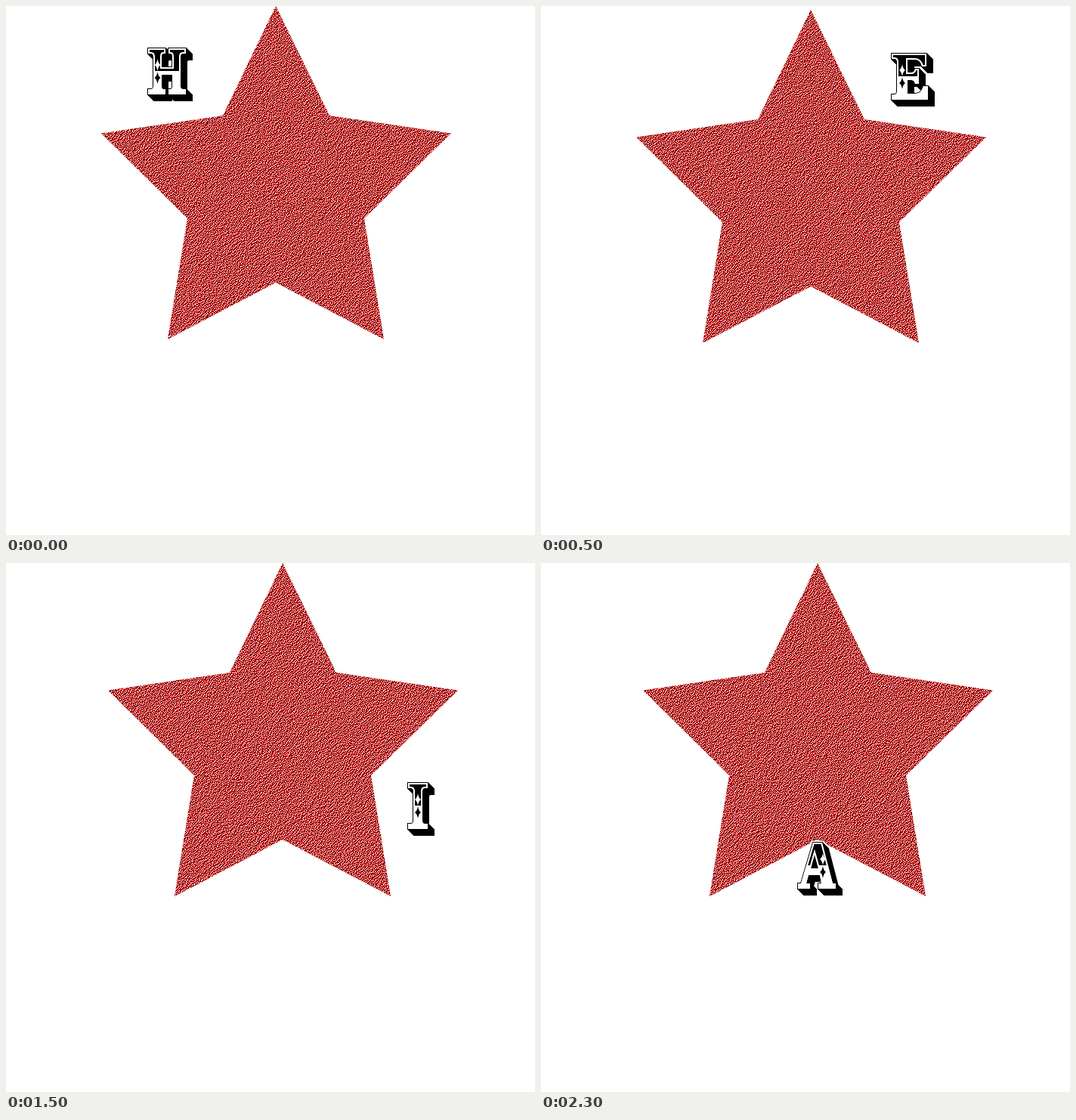
An HTML page with a canvas for the animation above (2500 ms loop, 700 by 700 pixels).

```html
<!DOCTYPE html>
<html lang="en">
<head>
<meta charset="utf-8">
<title>Glitter star</title>
<style>
  html, body { margin: 0; width: 100%; height: 100%; overflow: hidden; background: #fff; }
  canvas { display: block; }
</style>
</head>
<body>
<canvas id="stage" width="700" height="700" role="img" aria-label="HEFIA"></canvas>
<script>
const ctx = document.getElementById('stage').getContext('2d');
const SIZE = 700, TILE = 256, STEP = 500, DEPTH = 8;

// Shared left side of a slab-serif stem, drawn upwards from the baseline.
const STEM = 'H0v-7h4q3 0 3-4V11q0-4-3-4H0z';
const ARMS = 'M0 0h46v17h-6q-2-9-9-9H21v17h5q4 0 5-5h5v20h-5q-1-5-5-5h-5';
const glyphs = {
  H: 'M0 0h23v7h-3q-2 0-2 4v14h14v-14q0-4-2-4h-3v-7h23v7h-4q-3 0-3 4v39q0 4 3 4h4v7h-23v-7h3q2 0 2-4V35H18v15q0 4 2 4h3v7' + STEM,
  E: ARMS + 'v18h11q7 0 10-10h6v18' + STEM,
  F: ARMS + 'v15q0 4 3 4h5v7' + STEM,
  I: 'M0 0h26v7h-4q-3 0-3 4v39q0 4 3 4h4v7' + STEM,
  A: 'M20 0h12l14 54h4v7H27v-7h4l-2-11H14l-3 11h5v7H0v-7h4zM22 16l-5 18h10z'
};

// Each step: letter, its corner, x of its ornament, star offset, glitter seed.
const steps = [
  { letter: 'H', x: 188, y: 56, gem: 12.5, dx: 0, dy: 0, seed: 1 },
  { letter: 'E', x: 464, y: 63, gem: 14, dx: 0, dy: 5, seed: 2 },
  { letter: 'F', x: 124, y: 290, gem: 14, dx: 0, dy: 0, seed: 1 },
  { letter: 'I', x: 532, y: 291, gem: 13, dx: 9, dy: 0, seed: 3 },
  { letter: 'A', x: 340, y: 370, gem: 33, dx: 9, dy: 0, seed: 3 }
];

const star = new Path2D(
  'M357 0L428 145L589 168.500L474 281L500 441L357 366L214 441L240 281L126 168.500L287 145Z');

function random(seed) {
  let a = seed * 7919;
  return () => {
    a = (a + 0x6D2B79F5) | 0;
    let t = Math.imul(a ^ (a >>> 15), 1 | a);
    t = (t + Math.imul(t ^ (t >>> 7), 61 | t)) ^ t;
    return ((t ^ (t >>> 14)) >>> 0) / 4294967296;
  };
}

const specks = [[255, 0, 0], [0, 0, 0], [255, 255, 255]];
const shares = [.52, .22, .26];

// Even glitter: a colour not chosen here is more likely to the right and below.
function glitter(seed) {
  const tile = document.createElement('canvas');
  tile.width = tile.height = TILE;
  const tileCtx = tile.getContext('2d');
  const image = tileCtx.createImageData(TILE, TILE);
  const next = random(seed);
  const below = Array.from({ length: TILE }, () => [0, 0, 0]);
  for (let y = 0; y < TILE; y++) {
    let carry = [0, 0, 0];
    for (let x = 0; x < TILE; x++) {
      const want = shares.map((share, k) => share + carry[k] + below[x][k]);
      const scores = want.map(w => w + next() * .8);
      const pick = scores.indexOf(Math.max(...scores));
      want[pick] -= 1;
      carry = below[x] = want.map(w => w / 2);
      image.data.set([...specks[pick], 255], (y * TILE + x) * 4);
    }
  }
  tileCtx.putImageData(image, 0, 0);
  return ctx.createPattern(tile, 'repeat');
}

const patterns = { 1: glitter(1), 2: glitter(2), 3: glitter(3) };

function diamond(x, top, color) {
  ctx.fillStyle = color;
  ctx.fill(new Path2D(`M${x} ${top}q1 6 4 8q-3 2-4 8q-1-6-4-8q3-2 4-8z`));
}

function extrude(path, color, width) {
  ctx.fillStyle = ctx.strokeStyle = color;
  ctx.lineWidth = width;
  for (let k = 0; k <= DEPTH; k++) {
    ctx.save();
    ctx.translate(k, k);
    ctx.fill(path, 'evenodd');
    ctx.stroke(path);
    ctx.restore();
  }
}

function drawLetter({ letter, x, y, gem }) {
  const path = new Path2D(glyphs[letter]);
  ctx.save();
  ctx.translate(x, y);
  extrude(path, '#fff', 5);
  extrude(path, '#000', 2);
  ctx.clip(path, 'evenodd');
  ctx.fillStyle = '#fff';
  ctx.fillRect(0, 0, 60, 62);
  ctx.fillStyle = '#000';
  ctx.fillRect(0, 0, 60, 30);
  ctx.strokeStyle = '#fff';
  ctx.lineWidth = 4;
  ctx.stroke(path);
  diamond(gem, 14, '#fff');
  diamond(gem, 31, '#000');
  ctx.restore();
}

function draw(now) {
  const step = steps[Math.floor(now / STEP) % steps.length];
  ctx.fillStyle = '#fff';
  ctx.fillRect(0, 0, SIZE, SIZE);
  ctx.save();
  ctx.translate(step.dx, step.dy);
  ctx.fillStyle = patterns[step.seed];
  ctx.fill(star);
  ctx.restore();
  drawLetter(step);
}

const start = performance.now();
function tick() {
  draw(performance.now() - start);
  requestAnimationFrame(tick);
}
tick();
</script>
</body>
</html>
```
